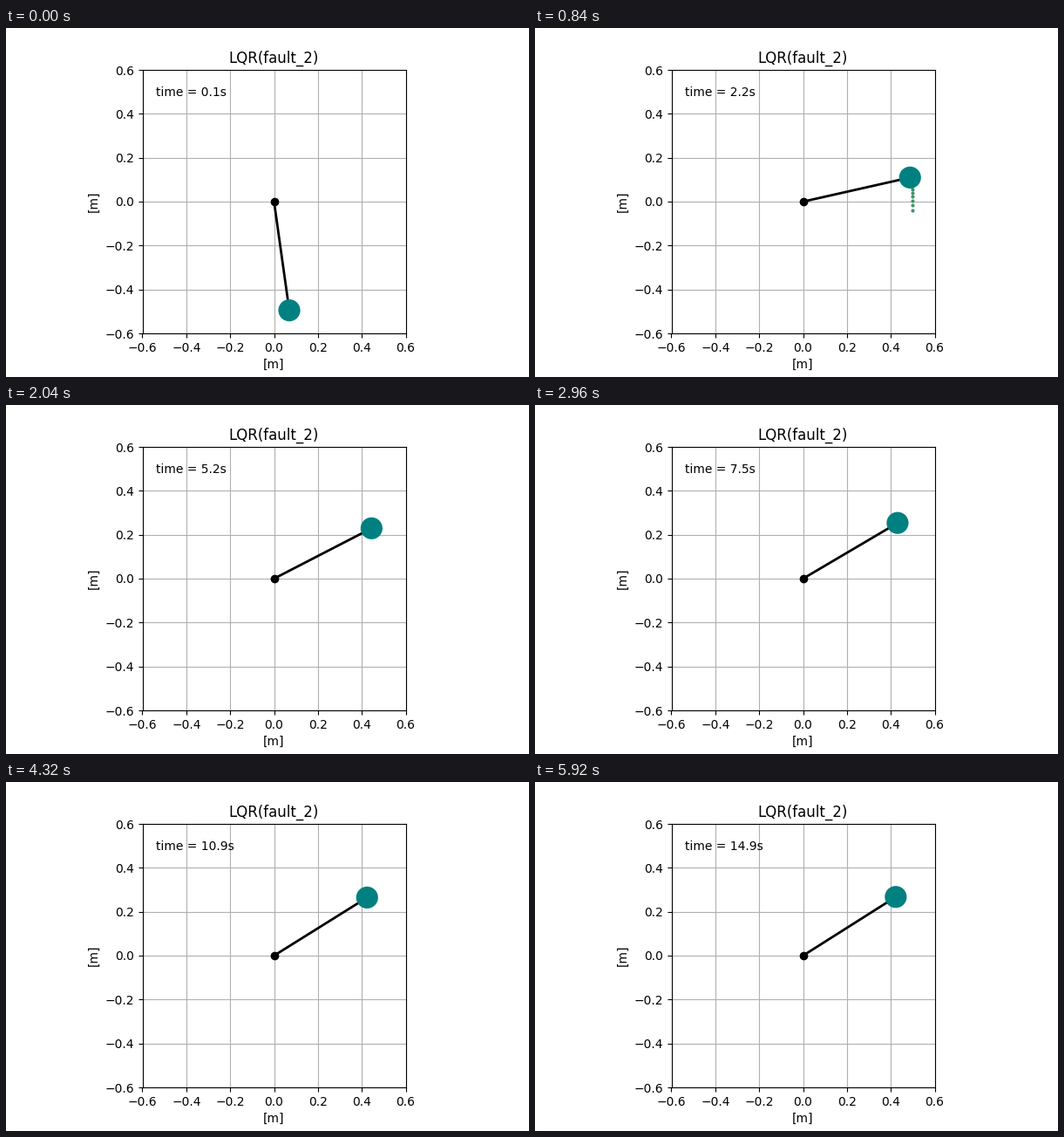
Write a matplotlib script that moves like this. It is 600 px wide and 400 px high and loops after 5.96 s.

```python
import numpy as np
import matplotlib.pyplot as plt
from matplotlib.animation import FuncAnimation
from matplotlib.patches import Circle

FRAMES = 149
LENGTH = 0.5
TRAIL = 10


def bob_position(i):
    """Overdamped swing from hanging down to the set point."""
    theta = np.radians(122.4 - 44.7 * np.exp(-0.0425 * i) - 69.7 * np.exp(-0.186 * i))
    return LENGTH * np.sin(theta), -LENGTH * np.cos(theta)


fig = plt.figure(figsize=(6, 4), dpi=100)
fig.subplots_adjust(left=0.125, right=0.9, bottom=0.125, top=0.88)
ax = fig.add_subplot(xlim=(-0.6, 0.6), ylim=(-0.6, 0.6), aspect="equal")
ax.set_title("LQR(fault_2)")
ax.set_xlabel("[m]")
ax.set_ylabel("[m]")
ax.grid()

rod, = ax.plot([], [], "o-", color="black", lw=2, zorder=2.5)
trail, = ax.plot([], [], ".", color="seagreen", ms=4, alpha=0.85, zorder=2.6)
bob = ax.add_patch(Circle((0, 0), 0.05, fc="teal", lw=0, zorder=3))
clock = ax.text(0.05, 0.9, "", transform=ax.transAxes)


def update(i):
    x, y = bob_position(i)
    rod.set_data([0, x], [0, y])
    trail.set_data(*bob_position(np.arange(max(0, i - TRAIL), i)))
    bob.center = x, y
    clock.set_text(f"time = {(i + 1) / 10:.1f}s")
    return rod, trail, bob, clock


anim = FuncAnimation(fig, update, frames=FRAMES, interval=40, repeat=True)
plt.show()
```
